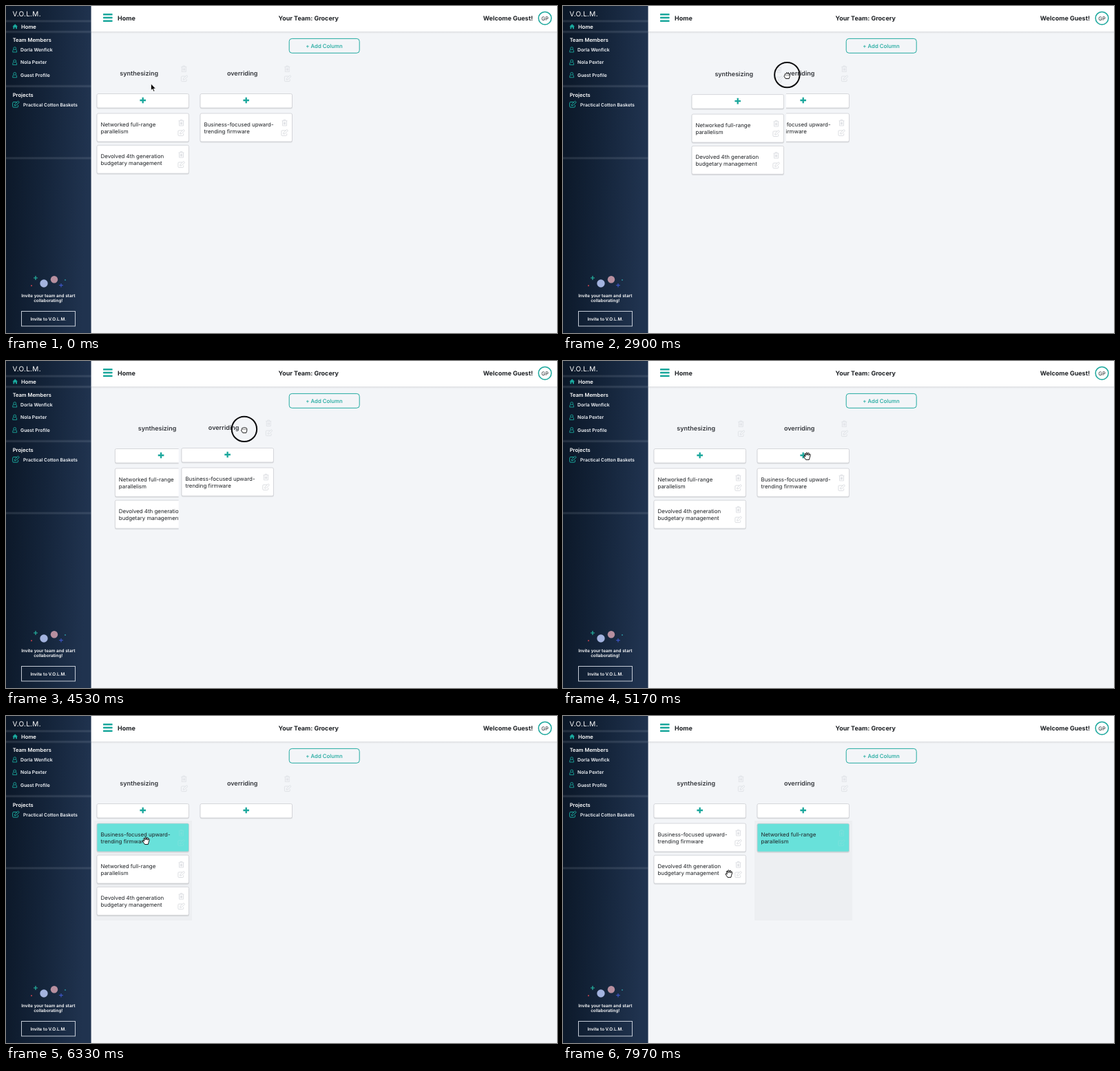
An HTML page that plays this animation: 800 by 475 pixels, repeating every 8000 ms.

```html
<!DOCTYPE html>
<html lang="en">
<head>
<meta charset="utf-8">
<title>Team board</title>
<style>
  html, body { margin: 0; width: 100%; height: 100%; overflow: hidden; background: #f3f5f8; }
  svg { display: block; width: 100%; height: 100%; }
  text { font-family: Inter, "Open Sans", sans-serif; text-rendering: geometricPrecision; white-space: pre; }
</style>
</head>
<body>
<svg id="stage" viewBox="0 0 800 475" xmlns="http://www.w3.org/2000/svg">
  <defs>
    <linearGradient id="navy" x1="0" y1="0" x2="1" y2="0.12">
      <stop offset="0" stop-color="#0b1727"/>
      <stop offset="0.5" stop-color="#14243a"/>
      <stop offset="1" stop-color="#20334f"/>
    </linearGradient>
    <linearGradient id="fade" x1="0" y1="0" x2="0" y2="1">
      <stop offset="0" stop-color="#000" stop-opacity="0.09"/>
      <stop offset="1" stop-color="#000" stop-opacity="0"/>
    </linearGradient>
    <linearGradient id="glow" x1="0" y1="0" x2="0" y2="1">
      <stop offset="0" stop-color="#fff" stop-opacity="0"/>
      <stop offset="0.5" stop-color="#dfe8f5" stop-opacity="0.14"/>
      <stop offset="1" stop-color="#fff" stop-opacity="0"/>
    </linearGradient>
    <g id="trash" fill="none" stroke="currentColor" stroke-width="0.9">
      <path d="M-4-2.9H4M-1.4-3V-4.4H1.4V-3M-3-2.8V4.2H3V-2.8M-1.2-1V2.6M0-1V2.6M1.2-1V2.6"/>
    </g>
    <g id="edit" fill="none" stroke="currentColor" stroke-width="1" stroke-linejoin="round">
      <path d="M1.6-3.4H-3.4Q-4.6-3.4-4.6-2.2V3Q-4.6 4.2-3.4 4.2H2Q3.2 4.2 3.2 3V1"/>
      <path d="M-1.8 1.8L-1.4-.3L3.3-4.7L5-3.1L.3 1.4Z"/>
    </g>
    <g id="user" fill="none" stroke="#1aa79c" stroke-width="0.9">
      <circle cy="-1.8" r="1.9"/>
      <path d="M-1.7-.5Q-3 .3-3 3.6H3Q3 .3 1.7-.5"/>
    </g>
    <g id="plus"><path d="M-4.3 0H4.3M0-4.3V4.3" stroke="#1aa79c" stroke-width="2.3"/></g>
    <path id="arrow" d="M0 0V9.6L2.2 7.6L3.8 11.2L5.3 10.5L3.8 7.1H6.9Z" fill="#000" stroke="#fff" stroke-width="0.7"/>
    <g id="fist" fill="#fff" stroke="#000" stroke-width="0.9" stroke-linejoin="round">
      <path d="M-2.2 4.4L-4.2 1.4Q-4.6-.2-3.2-.2L-3.3-2Q-2.7-3.4-1.6-2.6Q-.9-3.9.3-2.9Q1.3-3.8 2-2.6Q3.5-3 3.8-1.4V1.4L2.8 4.4Z"/>
      <path d="M-1.4-1.2V.2M.4-1.2V.2M2.1-1.2V.2" stroke-width="0.6"/>
    </g>
    <g id="palm" fill="#fff" stroke="#000" stroke-width="0.9" stroke-linejoin="round">
      <path d="M-2 5.4L-4.9.9Q-5.1-.6-3.5-.1L-2.6.9L-3.7-2.9Q-3.5-4.3-2.3-3.6L-1.5-1.3L-1.4-4.7Q-.6-5.8.2-4.7L.4-1.4L1.5-4.4Q2.6-5.1 2.9-3.8L2.3-.9L3.6-2.6Q4.9-2.9 4.7-1.4L3.7 2.2L2.8 5.4Z"/>
    </g>
  </defs>
</svg>
<script>
const LOOP = 8000, LAG = 70, TEAL = '#1aa79c', INK = '#1d2024';
const stage = document.getElementById('stage');

const text = (x, y, str, size, weight = 400, fill = INK, anchor = 'start', extra = '') =>
  `<text x="${x}" y="${y}" font-size="${size}" font-weight="${weight}" fill="${fill}" text-anchor="${anchor}" ${extra}>${str}</text>`;
const rect = (x, y, w, h, fill, extra = '') =>
  `<rect x="${x}" y="${y}" width="${w}" height="${h}" fill="${fill}" ${extra}/>`;
const use = (id, x, y, color = '#dcdee2') => `<use href="#${id}" x="${x}" y="${y}" color="${color}"/>`;
const dot = (x, y, r, fill) => `<circle cx="${x}" cy="${y}" r="${r}" fill="${fill}"/>`;
const cross = (x, y, r, color) =>
  `<path d="M${x - r} ${y}H${x + r}M${x} ${y - r}V${y + r}" stroke="${color}" stroke-width="1.2"/>`;

function panel(x, y, w, h, cls = '') {
  return rect(x - .4, y + .6, w + .8, h + 1, '#000', 'rx="2.5" opacity="0.1"') +
    rect(x, y, w, h, '#fff', `rx="2" stroke="#cdcfd3" stroke-width="0.8" ${cls}`);
}

function card(id, x, y, lines) {
  return `<g id="${id}">` + panel(x, y, 133.5, 41, 'class="face"') +
    lines.map((line, i) => text(x + 5.5, y + 19 + i * 9.7, line, 7.9)).join('') +
    `<g class="icons">${use('trash', x + 122.5, y + 13.7)}${use('edit', x + 122.5, y + 28.2)}</g></g>`;
}

function column(id, x, title, cards) {
  return `<g id="${id}">` + rect(x - 4.3, 80, 141.3, 172, '#f3f5f8', 'class="back"') +
    text(x + 61.2, 101.3, title, 9, 600, '#34373c', 'middle') +
    use('trash', x + 126.3, 91.3, '#e0e3e7') + use('edit', x + 127, 105.4, '#e0e3e7') +
    panel(x, 127.5, 133.5, 20.5) + use('plus', x + 66.7, 137) + cards + '</g>';
}

const dropZone = (id, x) => rect(x - 4, 152, 142, 100, '#edeff2', `id="${id}"`);

function sidebar() {
  const member = (name, y) => use('user', 12.7, y) + text(21, y + 2.6, name, 6.85, 600, '#f2f5f9');
  return rect(0, 0, 123.6, 475, 'url(#navy)') +
    [22, 37.5, 116.5, 221].map(y => rect(0, y - 2.5, 123.6, 5, 'url(#glow)')).join('') +
    text(9.5, 14.6, 'V.O.L.M.', 10, 400, '#fff', 'start', 'letter-spacing="0.3"') +
    `<path d="M9.4 29.8L13.2 26.2L17 29.8H16V33.2H14.1V31H12.3V33.2H10.4V29.8Z" fill="${TEAL}"/>` +
    text(22, 32.6, 'Home', 7.7, 600, '#fff') +
    text(9.7, 51.8, 'Team Members', 7.5, 600, '#fff') +
    member('Dorla Wenfick', 63.4) + member('Nola Pexter', 81.8) + member('Guest Profile', 100.2) +
    text(9.7, 132.2, 'Projects', 7.6, 600, '#fff') +
    use('edit', 14.3, 142.9, TEAL) +
    text(25, 146.2, 'Practical Cotton Baskets', 6.7, 600, '#f2f5f9') +
    cross(43, 395, 3, '#27b8a4') + cross(80, 405.7, 2.8, '#3d55c4') +
    dot(37, 406.3, 1, '#d0464f') + dot(86, 398, 1, '#2a8f9c') +
    dot(55, 403, 5.7, '#a3b3df') + dot(70, 397.3, 5.2, '#b78f9f') +
    text(61.3, 422.5, 'Invite your team and start', 6.35, 600, '#fff', 'middle') +
    text(61.3, 430, 'collaborating!', 6.35, 600, '#fff', 'middle') +
    rect(22.5, 443.5, 78, 21.5, 'none', 'stroke="#c3cad5" stroke-width="1"') +
    text(61.5, 456.6, 'Invite to V.O.L.M.', 6.35, 600, '#fff', 'middle');
}

function header() {
  return rect(123, 37, 677, 3.5, 'url(#fade)') + rect(123, 0, 677, 37, '#fff') +
    [11.1, 15.8, 20.5].map(y => rect(141, y, 13.6, 2.4, TEAL, 'rx="0.6"')).join('') +
    text(162, 21.3, 'Home', 9, 700) +
    text(439.3, 21.3, 'Your Team: Grocery', 9, 700, INK, 'middle') +
    text(765, 21.3, 'Welcome Guest!', 9, 700, INK, 'end') +
    `<circle cx="782.5" cy="17.7" r="9.3" fill="none" stroke="${TEAL}" stroke-width="1.5"/>` +
    text(782.5, 20.5, 'GP', 7.6, 400, INK, 'middle') +
    rect(411.2, 47.4, 102, 20.9, 'none', `rx="4" stroke="${TEAL}" stroke-width="0.95"`) +
    text(462, 60.8, '+ Add Column', 7.85, 500, TEAL, 'middle');
}

stage.insertAdjacentHTML('beforeend',
  rect(0, 0, 800, 475, '#f3f5f8') + header() +
  dropZone('leftZone', 132) + dropZone('rightZone', 282) + '<g id="board">' +
  column('over', 282, 'overriding',
    card('firmware', 282, 156, ['Business-focused upward-', 'trending firmware'])) +
  column('synth', 132, 'synthesizing',
    card('budget', 132, 202.2, ['Devolved 4th generation', 'budgetary management']) +
    card('network', 132, 156, ['Networked full-range', 'parallelism'])) +
  '</g>' + sidebar() +
  `<g id="cursor"><circle id="ring" r="18.2" fill="none" stroke="#0b0b0d" stroke-width="2"/>
   <use id="pointer"/></g>`);

const el = {};
for (const node of stage.querySelectorAll(':scope > [id], #board [id]')) el[node.id] = node;
el.ring = document.getElementById('ring');
el.pointer = document.getElementById('pointer');

const clamp = v => Math.max(0, Math.min(1, v));
const smooth = v => (v = clamp(v), v * v * (3 - 2 * v));
const easeOut = v => 1 - (1 - clamp(v)) ** 3;
const shift = (t, start) => easeOut((t - start) / 200);
const within = (t, a, b) => t >= a && t < b;

// Pointer moves: start, end, x, y
const moves = [
  [0, 1000, 205.3, 97], [2500, 2640, 206, 97.7],
  [2735, 2969, 356, 100.7], [3250, 3850, 206, 100],
  [4009, 4629, 356, 98.8], [4900, 5450, 353, 179],
  [5575, 6075, 203, 179], [6250, 6850, 212, 222],
  [7120, 7420, 345, 190], [7650, 7960, 241, 229]
];
const presses = [[2640, 3100], [3900, 4720], [5480, 6180], [6980, 7600]];

function pointerAt(t) {
  let x = 210.5, y = 113;
  for (const [a, b, mx, my] of moves) {
    const k = smooth((t - a) / (b - a));
    x += (mx - x) * k;
    y += (my - y) * k;
  }
  return [x, y];
}

// Offset that trails the pointer, then settles on its target after release
function drag(t, start, release, tx, ty) {
  if (t < start) return [0, 0];
  const [px, py] = pointerAt(start), [x, y] = pointerAt(Math.min(t, release) - LAG);
  const k = easeOut((t - release) / 300);
  const dx = x - px, dy = y - py;
  return [dx + (tx - dx) * k, dy + (ty - dy) * k];
}

const place = (node, x, y) => node.setAttribute('transform', `translate(${x.toFixed(2)} ${y.toFixed(2)})`);
const show = (node, on) => node.setAttribute('visibility', on ? 'visible' : 'hidden');

function tint(node, active) {
  const face = node.querySelector('.face');
  face.setAttribute('fill', active ? '#68e1da' : '#fff');
  node.querySelector('.icons').setAttribute('opacity', active ? 0.15 : 1);
}

function zone(box, bottom) {
  show(box, bottom > 0);
  if (bottom) box.setAttribute('height', bottom - 152);
}

function draw(t) {
  const a = drag(t, 2735, 3100, 150, 0), b = drag(t, 4009, 4720, 150, 0);
  place(el.synth, a[0] - 150 * shift(t, 4443), a[1]);
  place(el.over, b[0] - 150 * shift(t, 2925), b[1]);

  // A column hides what lies beneath it only while it is dragged
  show(el.synth.querySelector('.back'), within(t, 2735, 3400));
  show(el.over.querySelector('.back'), within(t, 4009, 5020));
  const top = within(t, 4000, 6900) ? el.over : el.synth;
  if (el.board.lastElementChild !== top) el.board.appendChild(top);

  const down = 46.1 * shift(t, 5900), up = 46.1 * shift(t, 7270);
  const f = drag(t, 5575, 6180, -150, 0), n = drag(t, 7120, 7600, 150, -45.9);
  place(el.firmware, ...f);
  place(el.network, n[0], down + n[1]);
  place(el.budget, 0, down - up);
  tint(el.firmware, within(t, 5575, 6480));
  tint(el.network, t >= 7120);
  zone(el.rightZone, within(t, 5575, 5900) ? 252 : t >= 7270 ? 297 : 0);
  zone(el.leftZone, within(t, 5900, 6480) || within(t, 7120, 7270) ? 297 : 0);

  const held = presses.some(([p, q]) => within(t, p, q));
  place(el.cursor, ...pointerAt(t));
  show(el.ring, held);
  el.pointer.setAttribute('href', held ? '#fist' : t < 2640 ? '#arrow' : '#palm');
  el.pointer.setAttribute('y', held ? 1 : 0);
}

const begin = performance.now();
function tick() {
  draw((performance.now() - begin) % LOOP);
  requestAnimationFrame(tick);
}
tick();
</script>
</body>
</html>
```
